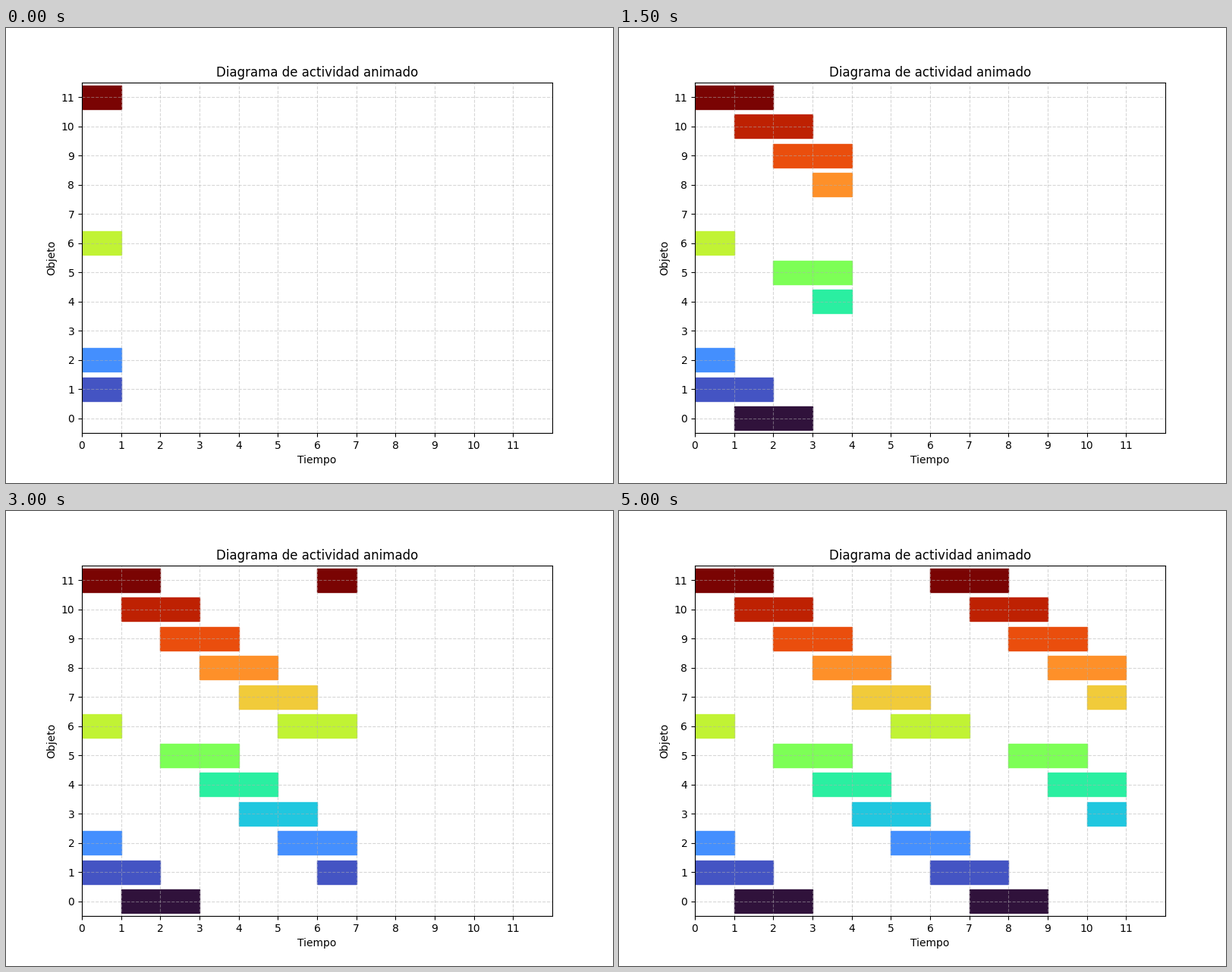
Animation of 800 by 600 pixels, one loop 6000 ms. Source, as a matplotlib script:

```python
import matplotlib.pyplot as plt
import numpy as np
from matplotlib.animation import FuncAnimation
from matplotlib.patches import Rectangle

ROWS = 12
STEPS = 12
LAST = 10  # final column to appear; the picture then holds
HALF = ROWS // 2
COLORS = plt.cm.turbo(np.linspace(0, 1, ROWS))


def active_rows(t):
    """Two neighbouring rows step down through each half, wrapping around."""
    lower = [(k - t) % HALF for k in (1, 2)]
    upper = [HALF + (k - t) % HALF for k in (5, 6)]
    return lower + upper


plt.rcParams["font.family"] = "DejaVu Sans"
fig, ax = plt.subplots(figsize=(8, 6), dpi=100)
ax.set_xlim(0, STEPS)
ax.set_ylim(-0.5, ROWS - 0.5)
ax.set_xticks(range(STEPS))
ax.set_yticks(range(ROWS))
ax.set_xlabel("Tiempo")
ax.set_ylabel("Objeto")
ax.set_title("Diagrama de actividad animado")
ax.grid(True, linestyle="--", alpha=0.5)

blocks = []
for t in range(LAST + 1):
    for row in active_rows(t):
        block = Rectangle((t, row - 0.4), 1, 0.8, color=COLORS[row])
        ax.add_patch(block)
        blocks.append((t, block))


def update(frame):
    for t, block in blocks:
        block.set_visible(t <= frame)
    return [block for _, block in blocks]


def init():
    return update(0)


anim = FuncAnimation(fig, update, frames=STEPS, init_func=init,
                     interval=500, repeat=True, repeat_delay=0, blit=False)
plt.show()
```
